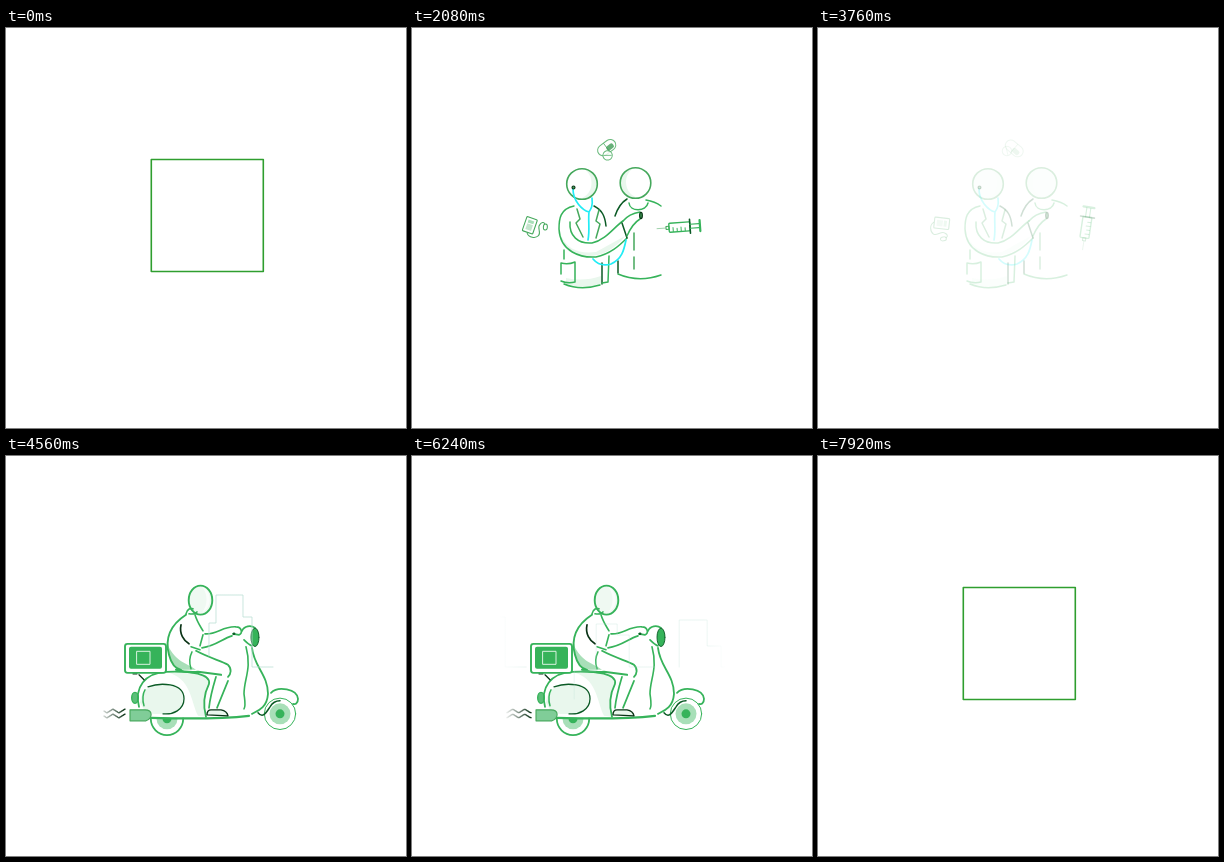
Recreate the animation shown at these times as an HTML page with a canvas. Size 400 by 400 pixels, loop 8000 ms.

```html
<!DOCTYPE html>
<html lang="en">
<head>
<meta charset="utf-8">
<title>Care and delivery</title>
<style>
html, body { margin: 0; width: 100%; height: 100%; overflow: hidden; background: #fff; }
canvas { display: block; width: 100vmin; height: 100vmin; }
</style>
</head>
<body>
<canvas id="stage"></canvas>
<script>
const LOOP = 8000, SIZE = 400;
const GREEN = '#36b35a', MID = '#45a85c', DARK = '#0b5a25', INK = '#0a3316';
const PALE = '#e9f7ed', SOFT = '#a8dfb8', CYAN = '#22ecf5', MARK = '#2f9e2f';
const canvas = document.getElementById('stage');
const ctx = canvas.getContext('2d');

const clamp = v => Math.max(0, Math.min(1, v));
const smooth = (a, b, t) => { const p = clamp((t - a) / (b - a)); return p * p * (3 - 2 * p); };
const easeInOut = p => p < .5 ? 2 * p * p : 1 - 2 * (1 - p) * (1 - p);

function line(d, color = GREEN, width = 1.5) {
  ctx.strokeStyle = color;
  ctx.lineWidth = width;
  ctx.stroke(new Path2D(d));
}
function area(d, color) {
  ctx.fillStyle = color;
  ctx.fill(new Path2D(d));
}
function oval(x, y, rx, ry, fill, stroke, width = 1.5) {
  ctx.beginPath();
  ctx.ellipse(x, y, rx, ry, 0, 0, Math.PI * 2);
  if (fill) { ctx.fillStyle = fill; ctx.fill(); }
  if (stroke) { ctx.strokeStyle = stroke; ctx.lineWidth = width; ctx.stroke(); }
}
function box(x, y, w, h, r, fill, stroke, width = 1.2) {
  ctx.beginPath();
  ctx.roundRect(x, y, w, h, r);
  if (fill) { ctx.fillStyle = fill; ctx.fill(); }
  if (stroke) { ctx.strokeStyle = stroke; ctx.lineWidth = width; ctx.stroke(); }
}
function group(x, y, degrees, alpha, draw) {
  if (alpha <= 0) return;
  ctx.save();
  ctx.translate(x, y);
  ctx.rotate(degrees * Math.PI / 180);
  ctx.globalAlpha *= alpha;
  draw();
  ctx.restore();
}

function emblem() {
  ctx.strokeStyle = MARK;
  ctx.lineWidth = 1.6;
  ctx.strokeRect(-56, -56, 112, 112);
}

function syringe() {
  line('M-23 0H-14', '#8cc79b', .8);
  line('M-14 -1.5H-11V1.5H-14Z', MID, 1);
  box(-11, -4.5, 21, 9, 1, null, GREEN, 1.4);
  line('M-7 4V0M-3 4V1M1 4V0M5 4V1', GREEN, 1);
  line('M10 -7V7', DARK, 1.6);
  line('M10 -2H19M10 2H19', GREEN, 1.1);
  line('M20 -5.5V5.5', GREEN, 2.2);
}
function monitor() {
  group(-5, 0, -14, 1, () => {
    box(-5.5, -7.5, 11, 15, 1, null, MID, 1.1);
    box(-3, -5, 6, 3, 0, SOFT);
    box(-3, -1, 6, 6, 0, '#c3e5cc');
  });
  line('M-3 8C1 11 7 8 8 4C9 0 2 -2 3 -6C3 -9 5 -11 7 -9', MID, 1);
  group(9, -7, -28, 1, () => oval(0, 0, 2, 3, null, MID, 1));
}
function pills() {
  group(-1, -1, 20, 1, () => {
    box(-5.5, -10, 11, 20, 5.5, null, MID, 1);
    line('M-5 0H5', MID, .9);
    box(-1, -7, 5, 8, 2, '#3f9d56');
  });
  oval(4, 5, 4.7, 4.7, '#fff', MID, 1);
  line('M1 7L7 3', MID, .8);
}

function head(x, y, side) {
  oval(x, y, 15.3, 15.3);
  ctx.save();
  ctx.beginPath();
  ctx.arc(x, y, 15.3, 0, Math.PI * 2);
  ctx.clip();
  oval(x, y, 15.3, 15.3, PALE);
  oval(x - side * 5, y - 1, 14.5, 16, '#fff');
  ctx.restore();
  oval(x, y, 15.3, 15.3, null, MID, 1.6);
}

function clinic(t) {
  const turn = (t - 1360) * .046;
  group(268, 199, 29 - turn, 1, syringe);
  group(122, 200, turn, 1, monitor);
  group(195, 121, turn, 1 - .55 * smooth(1500, 2900, t), pills);

  // patient
  head(223.5, 155, -1);
  line('M217 175C218 184 234 184 236 175');
  line('M203 188C206 179 210 174 215 171', DARK);
  line('M234 172C240 173 245 175 249 178');
  line('M206 233V245', DARK);
  line('M222 205V222M222 229V241', MID);
  line('M206 246C220 252 235 252 249 247');

  // doctor
  area('M154 250Q172 254 189 248V257Q172 262 154 256Z', PALE);
  area('M148 205C154 222 168 226 184 224L213 208C198 227 181 231 164 226C153 222 148 215 148 205Z', PALE);
  head(170, 156, 1);
  line('M162 178C148 181 147 191 147 201C148 224 169 230 184 229C198 226 207 218 215 210');
  line('M158 194C157 208 166 216 180 215C194 212 203 198 211 193');
  line('M182 178C190 182 193 188 194 198', DARK);
  line('M165 181L168 191L164 195L171 209M187 182L184 193L188 196L184 210', MID);
  line('M152 222V231M152 256C164 261 178 260 188 257');
  line('M149 235Q156 237 163 234V254Q156 256 149 253M149 235V246');
  line('M190 235V256', DARK);
  line('M197 228L196 254M190 255L196 254');
  line('M210 195L215 210', DARK);
  line('M211 193C216 187 222 185 228 184M215 208C218 201 223 194 228 191');

  line('M161 161C161 173 170 182 177 184M180 170C181 178 179 181 177 184C176 193 178 202 176 212', CYAN, 1.7);
  line('M181 231C186 237 192 238 199 236C210 231 212 222 214 212', CYAN, 1.7);
  oval(161.5, 159.5, 1.5, 1.5, MID, INK, 1.1);
  oval(229, 187.5, 1.3, 3.1, MID, INK, 1.3);
}

function wheel(x, y, r) {
  oval(x, y, r, r, null, GREEN, r > 16 ? 1.8 : 1);
  oval(x, y, 10.5, 10.5, SOFT);
  oval(x, y, 4.5, 4.5, GREEN);
}

function scooter() {
  ctx.save();
  ctx.beginPath();
  ctx.rect(140, 262, 42, 22);
  ctx.clip();
  wheel(161, 263, 16.2);
  ctx.restore();
  wheel(274, 258, 15.7);
  line('M265 237C272 230 291 233 292 243C292 248 289 249 287 248', GREEN, 1.8);
  line('M252 257C257 263 260 257 264 251C267 246 270 245 274 245', DARK);

  // rear shell
  oval(129, 242, 3.3, 5.5, '#5cbf79', GREEN, 1.4);
  area('M134 247C136 230 149 228 164 228C178 228 181 248 172 254C165 259 149 259 140 257Z', PALE);
  area('M160 216C184 215 205 219 203 228C197 240 197 250 200 261L192 260C184 244 186 223 160 216Z', PALE);
  line('M133 251C128 232 139 217 160 216C185 215 205 218 203 228C197 240 197 250 200 261', GREEN, 1.8);
  line('M138 250C136 244 137 237 139 234', GREEN);
  line('M142 231C153 227 178 226 178 243C178 254 167 259 157 258', DARK, 1.3);
  line('M145 262C180 263 216 263 243 260', GREEN, 2.2);
  area('M124 254H139C147 254 147 262 140 265H124Z', '#80cd98');
  line('M124 254H139C147 254 147 262 140 265H124Z', MID, 1.1);

  // front shield
  line('M246 192C248 211 262 219 262 238C261 252 252 255 246 258', GREEN, 1.8);
  line('M240 191C246 213 238 223 238 238C239 246 240 250 238 253', GREEN, 1.6);
  line('M236 175C238 170 245 169 249 172M238 184C241 187 243 189 246 190', GREEN, 1.7);
  oval(249, 181.5, 4, 9.2, GREEN, DARK, .9);

  // cargo box
  line('M127 218H131M133 219L138 224', INK, 1.3);
  box(119, 188, 41, 29, 2.5, '#fff', GREEN, 1.9);
  box(123, 191, 33, 22, 2, GREEN);
  box(131, 195.5, 13, 13, 0, null, '#d9f2e0', 1);

  // rider
  area('M162 190C163 204 168 212 172 214L190 214C180 207 170 206 162 190Z', SOFT);
  line('M180 159C163 170 159 184 163 199C165 207 169 213 175 214', GREEN, 1.9);
  line('M170 214Q181 217 192 216L215 219', GREEN, 2.1);
  oval(194.5, 144.3, 11.8, 14.5, 'rgba(225,244,231,.55)', GREEN, 1.9);
  area('M196 131C205 134 208 151 196 157C202 149 202 138 196 131Z', 'rgba(255,255,255,.65)');
  line('M180 158C181 153 185 152 187 153M183 158Q189 159 191 156', GREEN, 1.6);
  line('M189 159C191 166 194 170 197 175M197 179L194 190', GREEN, 1.6);
  line('M175 169C173 178 178 185 183 188', INK, 1.7);
  line('M199 178C211 179 217 170 230 171C236 171 237 178 233 179L227 178M196 192C210 190 216 183 226 180', GREEN, 1.7);
  oval(228, 178, 1.4, 1.4, DARK);
  line('M185 191L194 194M186 196C183 202 183 207 185 213', GREEN, 1.5);
  line('M190 195C205 203 216 205 222 209C226 213 225 218 222 221', GREEN, 1.8);
  line('M222 225L211 252M210 221C207 231 204 242 203 252', GREEN, 1.7);
  area('M201 259Q201 254 205 254L215 254Q221 255 222 260Z', PALE);
  line('M201 259Q201 254 205 254L215 254Q221 255 222 260Z', INK, 1.4);
}

function skyline(t) {
  const shift = -320 * easeInOut(clamp((t - 4560) / 3440));
  ctx.save();
  ctx.translate(shift, 0);
  const fade = ctx.createLinearGradient(87 - shift, 0, 314 - shift, 0);
  fade.addColorStop(0, 'rgba(184,222,211,0)');
  fade.addColorStop(.12, 'rgba(184,222,211,1)');
  fade.addColorStop(.9, 'rgba(184,222,211,1)');
  fade.addColorStop(1, 'rgba(184,222,211,0)');
  ctx.globalAlpha *= .75 - .45 * smooth(5300, 6200, t);
  line('M203 200V167H210V139H237V161H246V211H267M315 243V215H337V168H358V179H370V211H396M420 211V164H448V190H462V211H490', fade, 1);
  ctx.restore();
}

function smoke(t) {
  const fade = ctx.createLinearGradient(95, 0, 119, 0);
  fade.addColorStop(0, 'rgba(20,50,30,.1)');
  fade.addColorStop(.5, 'rgba(20,50,30,.55)');
  fade.addColorStop(1, INK);
  ctx.strokeStyle = fade;
  ctx.lineWidth = 1.4;
  const grow = smooth(4100, 4900, t);
  for (const y of [255, 260]) {
    ctx.beginPath();
    for (let x = 119; x >= 101 - 6 * grow; x--) {
      const wave = Math.asin(Math.sin((x + t * .018) * Math.PI / 6)) * 1.2;
      ctx.lineTo(x, y + wave);
    }
    ctx.stroke();
  }
}

function delivery(t) {
  const bob = -1.5 + 3 * Math.sin((t - 4560) / 840 * Math.PI * 2 + .45);
  smoke(t);
  group(0, bob, 0, 1, scooter);
  skyline(t);
}

function render(t) {
  const scale = canvas.width / SIZE;
  ctx.setTransform(scale, 0, 0, scale, 0, 0);
  ctx.globalAlpha = 1;
  ctx.fillStyle = '#fff';
  ctx.fillRect(0, 0, SIZE, SIZE);
  ctx.lineCap = ctx.lineJoin = 'round';
  const markAlpha = 1 - smooth(80, 480, t) + smooth(7440, 7800, t);
  group(201.3, 187.5, 0, markAlpha, emblem);
  group(0, 0, 0, smooth(320, 800, t) * (1 - smooth(3560, 3840, t)), () => clinic(t));
  group(0, 0, 0, smooth(3760, 4160, t) * (1 - smooth(7280, 7600, t)), () => delivery(t));
}

function resize() {
  const side = Math.min(innerWidth, innerHeight) * (window.devicePixelRatio || 1);
  canvas.width = canvas.height = Math.max(1, Math.round(side));
}
addEventListener('resize', resize);
resize();

const start = performance.now();
function frame() {
  render((performance.now() - start) % LOOP);
  requestAnimationFrame(frame);
}
frame();
</script>
</body>
</html>
```
